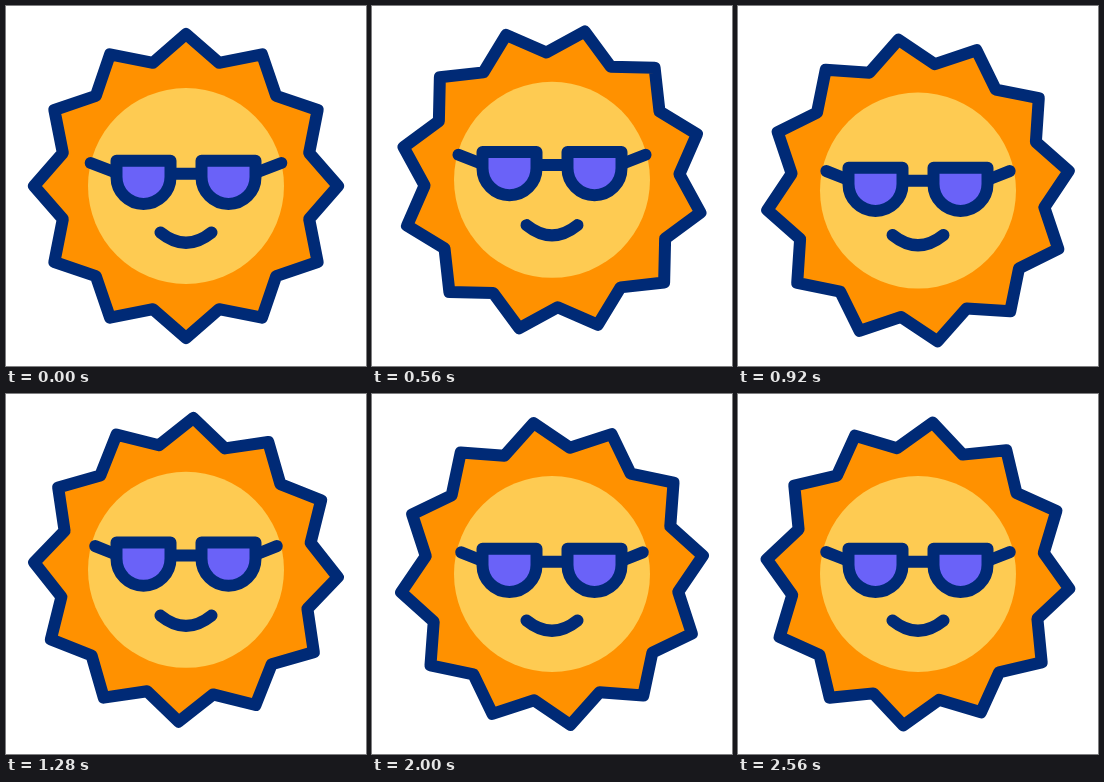
Recreate the animation shown at these times as an HTML page with a canvas. Size 360 by 360 pixels, loop 2.6 s.

```html
<!DOCTYPE html>
<html lang="en">
<head>
<meta charset="utf-8">
<title>Sun with sunglasses</title>
<style>
  html, body { margin: 0; width: 100%; height: 100%; overflow: hidden; background: #fff; }
  canvas { display: block; width: 360px; height: 360px; }
</style>
</head>
<body>
<canvas id="stage" width="360" height="360"></canvas>
<script>
const LOOP = 2600, STEP = 40, CENTER = 180;
const NAVY = '#002a76', ORANGE = '#ff9100', YELLOW = '#fecb52', PURPLE = '#6a62f8';

// Vertical bounce as [time, offset] keys
const KEY_TIMES = [0, 360, 630, 980, 1110, 1340, 1760];
const bounce = offsets => KEY_TIMES.map((t, i) => [t, offsets[i]]);
const BODY_KEYS = bounce([0, 12, -9.5, 5.6, 5.6, -6, 0]);
const SMILE_KEYS = bounce([0, 12, -11, 3.5, 3.5, -6.5, 0]);
const GLASSES_KEYS = [...bounce([0, 14, -13, 8.5, 8.5, -9]).slice(0, 6), [1840, 0]];
const ARM_KEYS = [[0, 0], [1280, 4.5], [2300, 4.5], [2600, 3.5]];

const ctx = document.getElementById('stage').getContext('2d');

const ease = p => (1 - Math.cos(Math.PI * p)) / 2;

function valueAt(keys, t) {
  for (let i = 1; i < keys.length; i++) {
    const [t0, a] = keys[i - 1], [t1, b] = keys[i];
    if (t <= t1) return a + (b - a) * ease((t - t0) / (t1 - t0));
  }
  return keys[keys.length - 1][1];
}

function line(x0, y0, x1, y1) {
  ctx.beginPath();
  ctx.moveTo(x0, y0);
  ctx.lineTo(x1, y1);
  ctx.stroke();
}

function drawRays(angle) {
  ctx.beginPath();
  for (let i = 0; i < 24; i++) {
    const radius = i % 2 ? 127.5 : 152;
    const a = angle + i * Math.PI / 12;
    ctx.lineTo(radius * Math.sin(a), -radius * Math.cos(a));
  }
  ctx.closePath();
  ctx.fillStyle = ORANGE;
  ctx.fill();
  ctx.stroke();
}

function drawFace() {
  ctx.beginPath();
  ctx.arc(0, 0, 98, 0, 2 * Math.PI);
  ctx.fillStyle = YELLOW;
  ctx.fill();
}

function drawSmile() {
  ctx.beginPath();
  ctx.moveTo(-25.5, 46.5);
  ctx.quadraticCurveTo(0, 67, 25.5, 46.5);
  ctx.stroke();
}

function drawGlasses(inset) {
  line(-15, -12.3, 15, -12.3);
  for (const side of [-1, 1]) {
    line(side * 73, -14.5, side * (95.3 - inset), -23 + inset * 0.3);
    const x = side * 42.5, r = 27;
    ctx.beginPath();
    ctx.moveTo(x - r, -25.2);
    ctx.lineTo(x + r, -25.2);
    ctx.arc(x, -9, r, 0, Math.PI);
    ctx.closePath();
    ctx.fillStyle = PURPLE;
    ctx.fill();
    ctx.stroke();
  }
}

function placed(offset, draw) {
  ctx.save();
  ctx.translate(CENTER, CENTER + offset);
  draw();
  ctx.restore();
}

function render(t) {
  ctx.fillStyle = '#fff';
  ctx.fillRect(0, 0, 360, 360);
  ctx.strokeStyle = NAVY;
  ctx.lineWidth = 12;
  ctx.lineJoin = ctx.lineCap = 'round';

  placed(valueAt(BODY_KEYS, t), () => {
    drawRays(-2 * Math.PI * t / LOOP);
    drawFace();
  });
  placed(valueAt(SMILE_KEYS, t), drawSmile);
  placed(valueAt(GLASSES_KEYS, t), () => drawGlasses(valueAt(ARM_KEYS, t)));
}

const start = performance.now();

function tick() {
  const t = (performance.now() - start) % LOOP;
  render(Math.floor(t / STEP) * STEP);
  requestAnimationFrame(tick);
}
tick();
</script>
</body>
</html>
```
